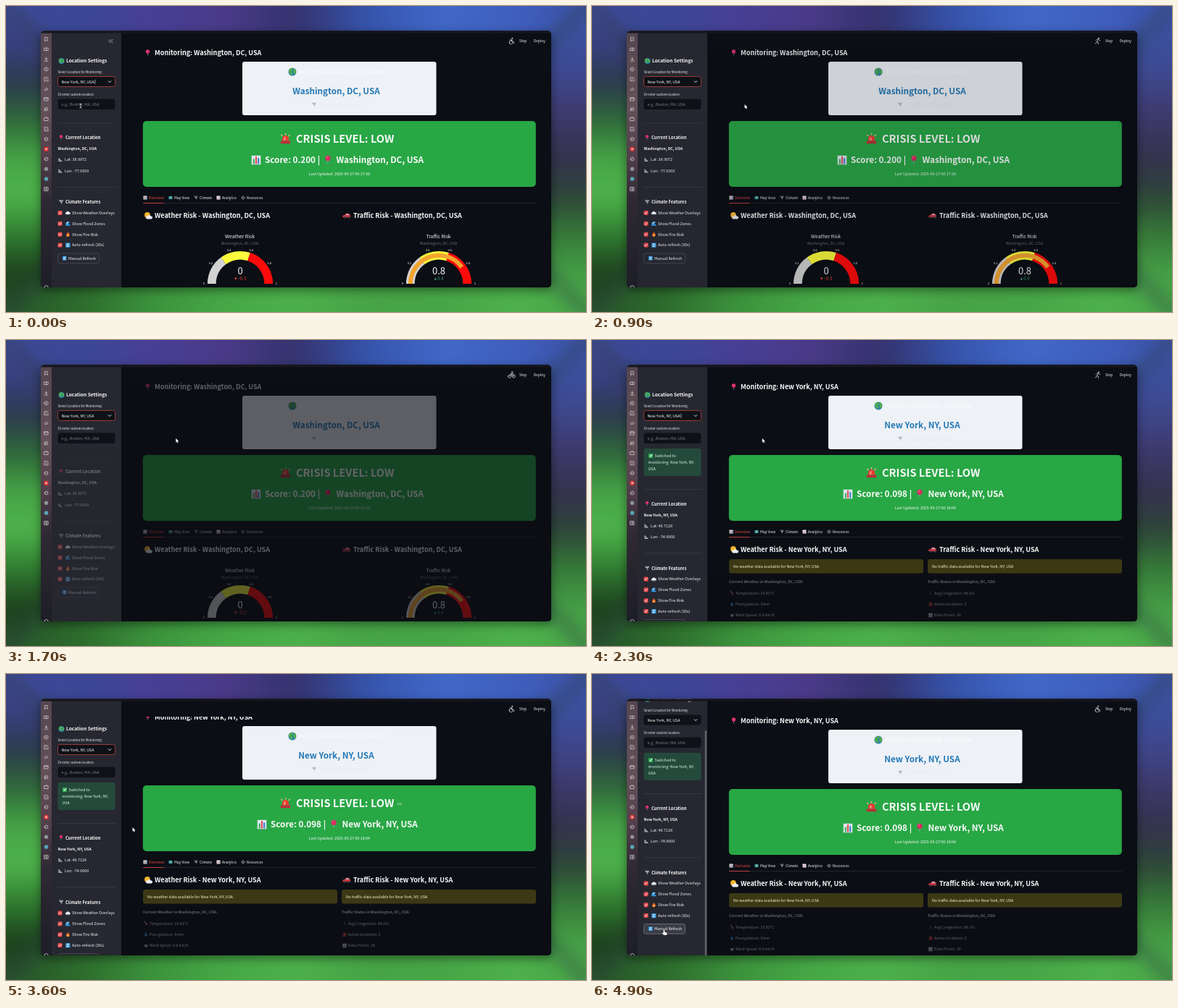
Recreate the animation shown at these times as an HTML page with a canvas. Size 800 px wide and 423 px high, loop 5000 ms.

```html
<!DOCTYPE html>
<html lang="en">
<head>
<meta charset="utf-8">
<title>Crisis monitor</title>
<style>
html, body { margin: 0; width: 100%; height: 100%; overflow: hidden; background: #26343c; }
canvas { display: block; width: 800px; height: 423px; }
</style>
</head>
<body>
<canvas id="stage"></canvas>
<script>
const W = 800, H = 423, LOOP = 5000, STEP = 100;
const FONT = '"Noto Sans CJK JP", "Noto Sans CJK SC", "Noto Sans", sans-serif';
const MAIN = '#0b0e14', SIDE = '#262730', RED = '#ff4b4b', WHITE = '#fafafa';
const dpr = window.devicePixelRatio || 1;
const stage = document.getElementById('stage');
stage.width = W * dpr;
stage.height = H * dpr;
const c = stage.getContext('2d');

// ---- drawing helpers ----
const disc = (x, y, r) => `M${x - r} ${y}a${r} ${r} 0 1 0 ${2 * r} 0a${r} ${r} 0 1 0 ${-2 * r} 0Z`;

function box(x, y, w, h, r, fill, line) {
  c.beginPath();
  c.roundRect(x, y, w, h, r);
  if (fill) { c.fillStyle = fill; c.fill(); }
  if (line) { c.strokeStyle = line; c.lineWidth = 0.8; c.stroke(); }
}

function text(s, x, y, size, color = WHITE, weight = 400, align = 'left') {
  c.font = `${weight} ${size}px ${FONT}`;
  c.textAlign = align;
  c.fillStyle = color;
  c.fillText(s, x, y + size * 0.36);
}
const bold = (s, x, y, size, color, align) => text(s, x, y, size, color, 700, align);

function stroke(d, x, y, scale, color, width) {
  c.save();
  c.translate(x, y);
  c.scale(scale, scale);
  c.strokeStyle = color;
  c.lineWidth = width;
  c.lineCap = c.lineJoin = 'round';
  c.stroke(new Path2D(d));
  c.restore();
}

// Pictograms: [colour, path] layers in a box from -10 to 10
const CLOUD = 'M-6 6a4 4 0 0 1 0-8a6 6 0 0 1 11-1a4.5 4.5 0 0 1 1 9Z';
const CHECK = 'M-6 0L-4-2L-1 1L5-6L7-4L-1 5Z';
const SQUARE = 'M-9-9H9V9H-9Z';
const ICONS = {
  globe: [['#2b7fb0', disc(0, 0, 10)], ['#4fae4a', 'M-8-6Q-3-10 2-9L1-5L-3 0L1 3L-1 9L-6 5L-9-1ZM4-8L9-4L9 3L5 6L2 1L2-4Z']],
  pin: [['#a7b1bb', 'M-1 0H1L0 10Z'], ['#d92b62', disc(0, -4, 5.5)], ['#f2799d', disc(-1.5, -6, 1.5)]],
  siren: [['#f4b3a6', 'M-1-10H1V-7H-1ZM-9-7L-7-8L-5-5L-6-4ZM9-7L7-8L5-5L6-4Z'], ['#ee3b32', 'M-6 4V0A6 6 0 0 1 6 0V4Z'],
    ['#ff9a86', 'M-3 3V0A3 3 0 0 1 0-3V3Z'], ['#b8313a', 'M-9 9V4H9V9Z']],
  chart: [['#dfe8ef', SQUARE], ['#3fae5a', 'M-6 8V-2H-3V8Z'], ['#e14b55', 'M-1.5 8V-7H1.5V8Z'], ['#3d80d0', 'M3 8V-4H6V8Z']],
  ruler: [['#aab4c0', 'M-8 8V-9L9 8ZM-4 4H1L-4-1Z']],
  tornado: [['#a9b3bc', 'M-9-8H9L8-5H-8ZM-7-4H8L5-1H-5ZM-3 0H5L3 3H-2ZM0 4H4L1 9Z']],
  rain: [['#e8edf2', CLOUD], ['#6fb4e8', 'M-5 7H-4L-5 10H-6ZM0 7H1L0 10H-1ZM5 7H6L5 10H4Z']],
  wave: [['#2f9ae0', 'M-9 8V0Q-5-9 3-8Q9-6 7-2Q3-4 2 0Q3 4 9 4V8Z'], ['#c9e8fa', 'M-6-3Q-1-9 4-7Q-1-5-3 1Z']],
  fire: [['#f2662b', 'M0-10Q2-5 6-2Q9 8 0 9Q-9 8-6-1L-3-3Q-2-6 0-10Z'], ['#ffc83d', 'M0-1Q5 4 2 8H-2Q-5 5 0-1Z']],
  refresh: [['#2e93d8', SQUARE], ['#f4f8fb', 'M-6-1Q-5-6 1-6V-8L6-4L1-1V-3Q-3-3-3-1ZM6 1Q5 6-1 6V8L-6 4L-1 1V3Q3 3 3 1Z']],
  check: [['#2fae55', SQUARE], ['#fff', CHECK]],
  sun: [['#f8b62d', disc(-2, -2, 7)], ['#e9eef2', 'M-2 8a3.5 3.5 0 0 1 0-7a5 5 0 0 1 9 0a3.5 3.5 0 0 1 1 7Z']],
  car: [['#d9363e', 'M-10 4V-1L-5-2L-2-6H5L9-1V4Z'], ['#a9d4ee', 'M-3-2L-1-5H1V-2ZM2-2V-5H4L6-2Z'], ['#39404a', disc(-5, 4, 2.6) + disc(5, 4, 2.6)]],
  map: [['#3b9ec0', 'M-9-6L-3-8L3-6L9-8V6L3 8L-3 6L-9 8Z'], ['#7cba5a', 'M-3-8L3-6V2L-3 6Z']],
  line: [['#e4e9ee', SQUARE], ['#d6525c', 'M-8 5L-3 0L1 2L7-6L8-4L1 5L-3 3L-7 7Z']],
  gear: [['#b9c0c7', disc(0, 0, 7) + 'M-1.5-10H1.5V10H-1.5ZM-10-1.5H10V1.5H-10Z'], ['#343842', disc(0, 0, 3)]],
  therm: [['#d7dce2', 'M-8-9L-5-10L5 4L2 6Z'], ['#e0453f', disc(4, 5, 4)]],
  drop: [['#3f97dc', 'M0-9Q6-1 6 3A6 6 0 0 1-6 3Q-6-1 0-9Z']],
  wind: [['#a9b3bc', disc(-3, 0, 5) + disc(4, -2, 4) + disc(3, 4, 4)]],
  light: [['#4c5561', 'M-2-9H2V9H-2Z'], ['#e0453f', disc(0, -5, 1.6)]]
};
function icon(name, x, y, size) {
  c.save();
  c.translate(x, y);
  c.scale(size / 20, size / 20);
  for (const [color, d] of ICONS[name]) {
    c.fillStyle = color;
    c.fill(new Path2D(d), name === 'ruler' ? 'evenodd' : 'nonzero');
  }
  c.restore();
}

// ---- timing helpers ----
const clamp = v => Math.min(1, Math.max(0, v));
// cubic-bezier(.42, 0, 1, 1)
function easeIn(x) {
  let lo = 0, hi = 1;
  for (let i = 0; i < 18; i++) {
    const m = (lo + hi) / 2;
    if (1.26 * m * (1 - m) ** 2 + 3 * m * m * (1 - m) + m ** 3 < x) lo = m; else hi = m;
  }
  return 3 * lo * lo * (1 - lo) + lo ** 3;
}
const fade = (t, start) => 0.64 * easeIn(clamp((t - start) / 1000));

function track(keys, t) {
  let i = 0;
  while (i < keys.length - 2 && keys[i + 1][0] <= t) i++;
  const [a, b] = [keys[i], keys[i + 1]];
  const p = clamp((t - a[0]) / (b[0] - a[0])), e = p * p * (3 - 2 * p);
  return a.slice(1).map((v, n) => v + (b[n + 1] - v) * e);
}
const MOUSE = [[0, 103, 138], [200, 103, 138], [700, 187, 136], [1100, 234, 136], [2800, 235, 136],
  [3300, 222, 150], [3600, 174.5, 212], [4200, 112, 300], [4500, 110, 302], [4800, 99.5, 354], [5000, 99.5, 354]];
const SCROLL = [[0, 0], [3400, 0], [3600, 5], [3900, 0], [5000, 0]];
const SIDE_SCROLL = [[0, 0], [4200, 0], [4600, 41], [5000, 41]];
const POSES = [[0, 'chair'], [500, 'run'], [1000, 'chair'], [1500, 'bike'], [2000, 'run'], [2500, 'bike'], [3100, 'chair'], [3900, 'run'], [4500, 'chair']];
const SWITCH = 2000, BLUR = 4800;

const DC = { name: 'Washington, DC, USA', score: '0.200', lat: '38.9072', lon: '-77.0369', time: '00:17:38', x: 345 };
const NY = { name: 'New York, NY, USA', score: '0.098', lat: '40.7128', lon: '-74.0060', time: '00:18:04', x: 353 };

// ---- wallpaper ----
const wall = document.createElement('canvas');
wall.width = stage.width;
wall.height = stage.height;
function paintWall() {
  const g = wall.getContext('2d');
  g.scale(dpr, dpr);
  g.fillStyle = '#2c4048';
  g.fillRect(0, 0, W, H);
  g.filter = `blur(${14 * dpr}px)`;
  const edge = (pts, to, colors) => {
    const fill = g.createLinearGradient(0, 0, ...to);
    colors.forEach((col, i) => fill.addColorStop(i / (colors.length - 1), col));
    g.fillStyle = fill;
    g.beginPath();
    pts.forEach(p => g.lineTo(...p));
    g.fill();
  };
  edge([[-60, -60], [860, -60], [690, 110], [110, 110]], [W, 0],
    ['#3f4a98', '#3a4796', '#473f96', '#4a3a88', '#34336e', '#3654ac', '#4068c8', '#3f5fbe', '#3c52a8']);
  edge([[-60, 483], [860, 483], [690, 313], [110, 313]], [W, 0],
    ['#28552a', '#2c6a2c', '#3b923c', '#45a845', '#4cb04a', '#46a446', '#46a646', '#4cb04a', '#4aa848']);
  edge([[-60, -60], [110, 110], [110, 313], [-60, 483]], [0, H],
    ['#3f4a98', '#3a3f80', '#2c3a4c', '#2f6a3a', '#46a546', '#4db34a', '#2f7a30', '#1c3f1c', '#28552a']);
  edge([[860, -60], [690, 110], [690, 313], [860, 483]], [0, H],
    ['#3c52a8', '#3b4f9e', '#3e4588', '#3c3868', '#33324c', '#2d4638', '#357a38', '#46a046', '#4aa848']);
  g.filter = 'none';
  g.shadowColor = 'rgba(0,0,0,.45)';
  g.shadowBlur = 14 * dpr;
  g.shadowOffsetY = 4 * dpr;
  g.fillStyle = MAIN;
  g.beginPath();
  g.roundRect(48, 34.5, 704, 354.5, 5);
  g.fill();
}
paintWall();

// ---- parts of the window ----
function dock() {
  const fill = c.createLinearGradient(0, 34, 0, 389);
  [[0, '#55464f'], [0.3, '#645059'], [0.48, '#54404c'], [0.66, '#2f2933'], [1, '#1d1e27']].forEach(s => fill.addColorStop(...s));
  c.fillStyle = fill;
  c.fillRect(48, 34, 15, 355);
  const shapes = ['M-2-3H2V3L0 1L-2 3Z', 'M-3-2H3V2H-3ZM0-2V2', 'M0-3V1M-2-1L0 1L2-1M-3 3H3', disc(0, 0, 3) + 'M0-1V1',
    'M1-3H-3V3H3V0M-1 1L3-3', 'M-3 1L0-2L3 0M-2 2L2 1', 'M-3-2.5H3V2.5H-3ZM-3-1H3', disc(0, 0, 2.7) + 'M-3 3L-2 1M-1 0H1',
    'M-3-2H3V2.5H-3ZM-1-3H1', 'M2-3H-3V3H3V0M-1 0L0 1L3-2', disc(0, 0, 2.8) + 'M-1 1L1-1'];
  shapes.forEach((d, i) => stroke(d, 55.5, 46 + i * 13.8, 0.85, '#d3cdd2', 0.9));
  const dot = (y, r, color) => {
    c.fillStyle = color;
    c.fill(new Path2D(disc(55.5, y, r)));
  };
  dot(197.8, 3.2, '#e23b3b');
  dot(197.8, 1.1, '#fff');
  stroke(shapes[10], 55.5, 211.5, 0.85, '#d3cdd2', 0.9);
  dot(225.3, 2.7, '#8d939c');
  dot(239, 2.8, '#58a5b5');
  stroke('M-3-3H3V3H-3ZM0-2V2M-2 0H2', 55.5, 253, 0.85, '#d3cdd2', 0.9);
  stroke(disc(0, 0, 3), 55.5, 389, 0.85, '#d3cdd2', 0.9);
}

function sidebar(t, loc) {
  const isNY = loc === NY, [sy] = track(SIDE_SCROLL, t), d = isNY ? 44.5 : 0;
  c.fillStyle = SIDE;
  c.fillRect(63, 34, 96, 355);
  c.save();
  c.translate(0, -sy);
  if (t < 800) stroke('M-.5-2.5L-3 0L-.5 2.5M3-2.5L.5 0L3 2.5', 144.5, 48.5, 0.85, '#c8c9ce', 0.9);
  icon('globe', 76.5, 76, 8);
  bold('Location Settings', 83, 76, 6.6);
  text('Select Location for Monitoring:', 71.5, 91, 4.3);
  box(71.5, 97.5, 79, 14, 3, '#0e1117', t < BLUR ? '#b5463f' : '#191c24');
  text(NY.name, 76.5, 104.7, 5.35);
  if (t % 1000 < 500 && t < BLUR) {
    c.fillStyle = WHITE;
    c.fillRect(122.6, 101.8, 0.6, 6);
  }
  stroke('M-2-1L0 1L2-1', 143, 104.7, 0.9, WHITE, 1);
  text('Or enter custom location:', 71.5, 122, 4.25);
  box(71.5, 128.5, 79, 14.5, 3, '#0e1117');
  text('e.g., Boston, MA, USA', 76.5, 135.7, 5.3, '#80828a');
  if (isNY) {
    box(71.5, 150, 79, 38, 3, '#244a3b');
    icon('check', 81, 160, 6.5);
    text('Switched to', 86.5, 160, 5.3, '#dffde9');
    text('monitoring: New York, NY,', 77.5, 169, 5.3, '#dffde9');
    text('USA', 77.5, 178, 5.3, '#dffde9');
  }
  c.translate(0, d);
  c.fillStyle = '#3d3e47';
  c.fillRect(71.5, 161.7, 80, 0.7);
  c.fillRect(71.5, 250, 80, 0.7);
  icon('pin', 76, 182, 8);
  bold('Current Location', 82, 182, 5.85);
  bold(loc.name, 71.5, 197.3, 5.2);
  icon('ruler', 75, 212.5, 6.5);
  text('Lat: ' + loc.lat, 81, 212.5, 5.35);
  icon('ruler', 75, 228, 6.5);
  text('Lon: ' + loc.lon, 81, 228, 5.35);
  icon('tornado', 76, 271, 7);
  bold('Climate Features', 82, 271, 5.85);
  [['rain', 'Show Weather Overlays'], ['wave', 'Show Flood Zones'], ['fire', 'Show Fire Risk'], ['refresh', 'Auto-refresh (30s)']].forEach(([ic, label], i) => {
    const y = 286 + i * 14.85;
    box(71.5, y - 3, 6, 6, 1.2, '#e8484a');
    stroke('M-1.7 0L-.5 1.3L1.7-1.3', 74.5, y, 1, '#fff', 0.9);
    icon(ic, 85.3, y, 7);
    text(label, 91, y, 5.35);
  });
  const hot = t >= 4700;
  box(71.5, 342, 57, 13.7, 3, hot ? '#3b3c46' : '#272831', hot ? '#777882' : '#4b4c55');
  icon('refresh', 80.7, 348.7, 6.3);
  text('Manual Refresh', 86, 348.7, 5.3);
  c.restore();
  if (!isNY) {
    c.globalAlpha = fade(t, 700);
    c.fillStyle = SIDE;
    c.fillRect(63, 150, 96, 239);
    c.globalAlpha = 1;
  }
  if (sy > 0) box(155.7, 37 + sy, 2.4, 312, 1.2, '#62636b');
}

function gauge(x, title, value, delta, up, level) {
  const y = 384;
  const arc = (a, b, w, color) => {
    c.beginPath();
    c.arc(x, y, 39.2, Math.PI * (1 + a), Math.PI * (1 + b));
    c.strokeStyle = color;
    c.lineWidth = w;
    c.stroke();
  };
  text(title, x - 0.5, 318.5, 6.75, WHITE, 400, 'center');
  text(DC.name, x - 0.5, 328.3, 5.25, '#6d7077', 400, 'center');
  arc(0, 0.3, 11.8, '#d3d3d3');
  arc(0.3, 0.6, 11.8, '#fbfb3c');
  arc(0.6, 1, 11.8, '#ff0a0a');
  if (level) arc(0, level, 6, '#f3a52f');
  for (let i = 0; i <= 5; i++) {
    const a = Math.PI * (1 + i / 5);
    text(String(i / 5), x + Math.cos(a) * 50, y + Math.sin(a) * 49, 4.1, WHITE, 400, 'center');
  }
  text(value, x, 366, 13, WHITE, 400, 'center');
  const color = up ? '#3d9970' : '#ff4136';
  text(delta, x + 2.5, 377, 6, color, 400, 'center');
  c.fillStyle = color;
  const s = up ? -1 : 1, left = x - (up ? 6.5 : 8);
  c.beginPath();
  c.moveTo(left, 377 - 1.5 * s);
  c.lineTo(left + 3.6, 377 - 1.5 * s);
  c.lineTo(left + 1.8, 377 + 1.7 * s);
  c.fill();
}

function readings(x, notice, title, rows) {
  box(x, 303, 268, 19.5, 3, '#3c3814');
  text(notice, x + 6, 312.8, 5.3, '#fbfad0');
  bold(title, x, 334, 5.1);
  rows.forEach(([ic, label], i) => {
    const y = 349.7 + i * 15.4;
    icon(ic, x + 4, y, 6);
    text(label, x + 9, y, 5.3);
  });
}

function main(t, loc) {
  const isNY = loc === NY, [sy] = track(SCROLL, t);
  c.fillStyle = MAIN;
  c.fillRect(159, 34, 593, 355);
  c.save();
  c.beginPath();
  c.rect(159, 59, 593, 330);
  c.clip();
  c.translate(0, -sy);
  icon('pin', 195.5, 65, 10);
  bold('Monitoring: ' + loc.name, 205, 65, 9.05);

  box(326, 77, 267.5, 74, 3, '#eef1f6');
  icon('globe', 395, 91, 11);
  bold('Active Monitoring Location', 404, 91, 9.05, '#f7f8fa');
  bold(loc.name, 455.5, 118, 11.7, '#2479b5', 'center');
  icon('tornado', 425, 136.3, 6.5);
  text('Climate Risk Monitor', 434, 136.3, 6.5, '#e8ebf0');

  box(188.8, 159, 542, 91, 5, '#28a745');
  icon('siren', 385.5, 183.5, 15);
  bold('CRISIS LEVEL: LOW', 400, 184, 14.65);
  if (t >= 3300 && t < 3800) stroke('M-1-1.2H-3V1.2H-1M1-1.2H3V1.2H1M-1.5 0H1.5', 543, 184.5, 0.9, '#8fcf9d', 0.8);
  icon('chart', loc.x, 213, 14);
  bold(`Score: ${loc.score} |`, loc.x + 12, 213, 11.7);
  icon('pin', loc.x + 99, 213, 13);
  bold(loc.name, loc.x + 110.5, 213, 11.7);
  text(`Last Updated: 2025-09-27 ${loc.time}`, 459.7, 232, 5.3, WHITE, 400, 'center');

  [['chart', 192, 'Overview'], ['map', 227, 'Map View'], ['tornado', 262, 'Climate'], ['line', 293, 'Analytics'], ['gear', 327, 'Resources']].forEach(([ic, x, label], i) => {
    icon(ic, x, 265, 5.6);
    text(label, x + 5, 265, 4.75, i ? WHITE : RED);
  });
  c.fillStyle = '#2b2d35';
  c.fillRect(189, 272.3, 542, 0.7);
  c.fillStyle = RED;
  c.fillRect(189, 272.2, 28.5, 0.7);

  icon('sun', 196, 290, 11);
  bold('Weather Risk - ' + loc.name, 205, 290, 9.05);
  icon('car', 470, 290, 11);
  bold('Traffic Risk - ' + loc.name, 479, 290, 9.05);
  if (isNY) {
    readings(189, 'No weather data available for ' + loc.name, 'Current Weather in Washington, DC, USA:',
      [['therm', 'Temperature: 20.83°C'], ['drop', 'Precipitation: 0mm'], ['wind', 'Wind Speed: 0.0 km/h'], ['rain', 'Visibility: 10 km']]);
    readings(463, 'No traffic data available for ' + loc.name, 'Traffic Status in Washington, DC, USA:',
      [['light', 'Avg Congestion: 88.1%'], ['siren', 'Active Incidents: 5'], ['chart', 'Data Points: 10']]);
  } else {
    gauge(323, 'Weather Risk', '0', '−0.3', false, 0);
    gauge(597, 'Traffic Risk', '0.8', '0.4', true, 0.8);
  }
  // Stale content sinks towards the page colour
  c.globalAlpha = isNY ? 0.64 : fade(t, 500);
  c.fillStyle = MAIN;
  c.fillRect(159, isNY ? 326 : 50, 593, 345);
  c.restore();

  const pose = POSES.filter(p => p[0] <= t).pop()[1];
  const figures = {
    chair: disc(-1, 2, 3) + disc(1, -4.5, 0.7) + 'M1-3L-1 0L3 1L4 4M0-2L-3-2',
    run: disc(2, -4.5, 0.8) + 'M1-3L-1 1L1 2L1 5M-1 1L-2 3L-4 4M-3-1L-1-3L1-3L3-1L4-1',
    bike: disc(-3.5, 2, 2.4) + disc(3.5, 2, 2.4) + disc(1, -5, 0.8) + 'M-3.5 2L-1-2L2-1L3.5 2M-1-2L1-3L3-2M-1-2L0 1'
  };
  stroke(figures[pose], 697.5, 48.5, 0.85, '#e6e7ea', 0.8);
  text('Stop', 708, 48.5, 4.8);
  text('Deploy', 728, 48.5, 4.8);
}

function pointer(t) {
  const [x, y] = track(MOUSE, t);
  if (t < 700 && x < 150) {
    stroke('M-1.3-3Q0-3 0-2V2Q0 3-1.3 3M1.3-3Q0-3 0-2M0 2Q0 3 1.3 3', x, y, 1, '#e8e8ea', 0.8);
    return;
  }
  const hand = t >= 4700;
  const shape = new Path2D(hand
    ? 'M-1 0Q0-1 .7 0V2.5L3.5 3.2Q4.5 4 3.5 7H-.5L-3 4Q-2.5 3-1 4Z'
    : 'M0 0V5.6L1.3 4.4L2.3 6.5L3.3 6L2.4 4.1H4Z');
  c.save();
  c.translate(x, y);
  c.fillStyle = '#fff';
  c.strokeStyle = '#111';
  c.lineWidth = 0.8;
  c.stroke(shape);
  c.fill(shape);
  c.restore();
}

function draw(t) {
  const loc = t < SWITCH ? DC : NY;
  c.setTransform(1, 0, 0, 1, 0, 0);
  c.drawImage(wall, 0, 0);
  c.setTransform(dpr, 0, 0, dpr, 0, 0);
  c.save();
  c.beginPath();
  c.roundRect(48, 34.5, 704, 354.5, 5);
  c.clip();
  main(t, loc);
  sidebar(t, loc);
  dock();
  c.fillStyle = '#17161d';
  c.fillRect(48, 34, 704, 3.5);
  c.restore();
  pointer(t);
}

const begin = performance.now();
function tick() {
  const t = (performance.now() - begin) % LOOP;
  draw(Math.floor(t / STEP) * STEP);
  requestAnimationFrame(tick);
}
tick();
</script>
</body>
</html>
```
